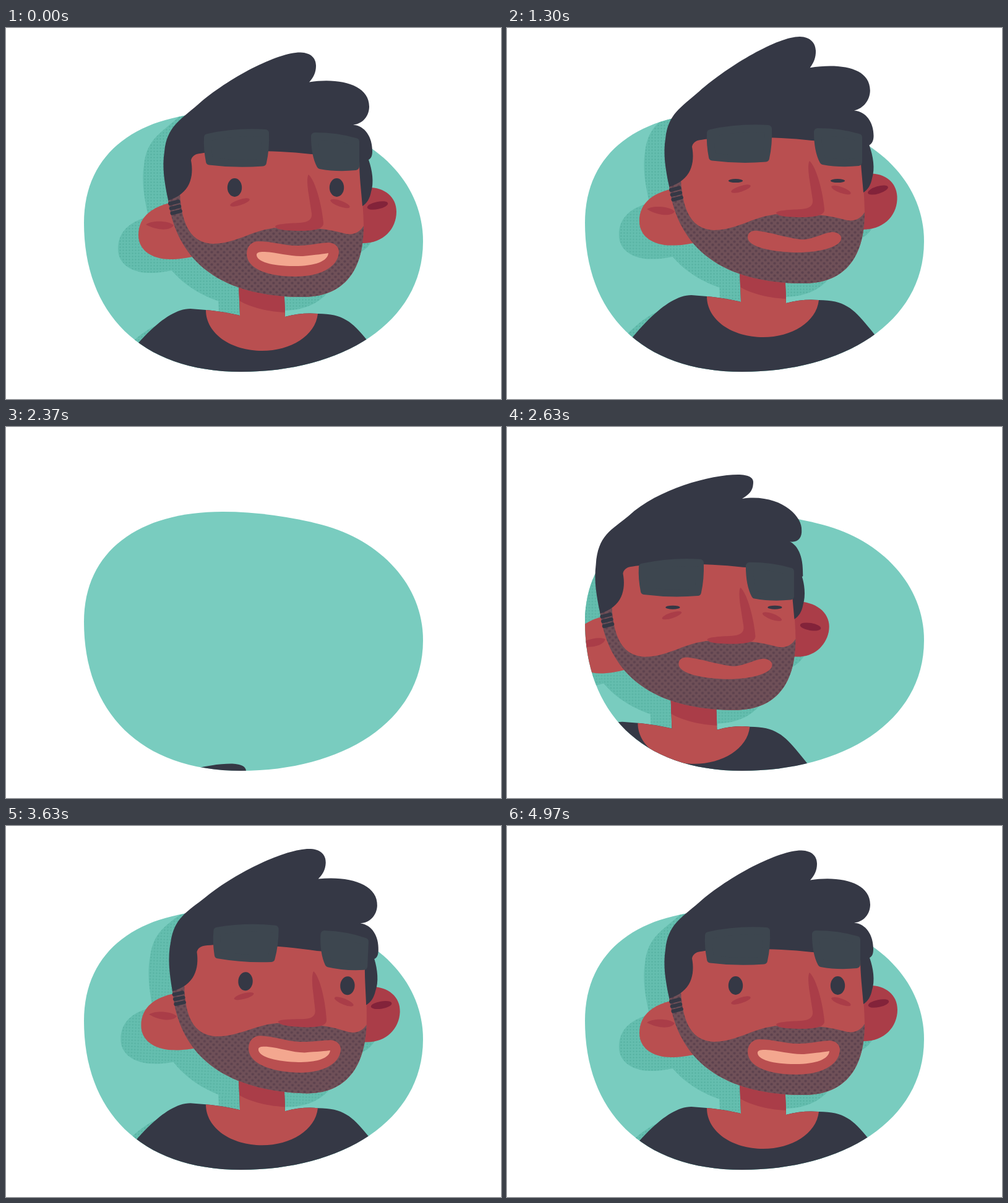
An HTML page with a canvas for the animation above (5.01 s loop, 800 by 600 pixels).

```html
<!DOCTYPE html>
<html lang="en">
<head>
<meta charset="utf-8">
<title>Hopping portrait</title>
<style>
html, body { margin: 0; width: 100%; height: 100%; overflow: hidden; background: #fff; }
canvas { display: block; }
</style>
</head>
<body>
<canvas id="stage" width="800" height="600"></canvas>
<script>
const ctx = document.getElementById('stage').getContext('2d');
const LOOP = 5010, STEP = 66.67;
const SKIN = '#b94f50', RED = '#aa3d48', WINE = '#83233a', DARK = '#353845', LENS = '#3d464f';
const TEAL = '#79ccbf', PEACH = '#f3a78f';

// Outlines
const DOME = 'M126 315C126 200 215 137 350 137C405 137 460 145 510 158C605 183 674 255 674 345';
const BOWL = 'C674 478 541 556 380 556C216 556 126 460 126 315Z';
const COLLAR = 'C345 458 362 461 378 465L376 410L449 410L451 467C470 462 487 460.5 504 462';
const TORSO = 'M170 700L180 552C205 518 255 454 298 454L323 456' + COLLAR + 'C545 462 560 476 582 503C598 522 612 540 620 560L630 700Z';
const CHEST = 'M323 456' + COLLAR + 'C500 498 460 522 414 522C365 522 323 495 323 456Z';
const NECK_SHADE = 'M376 410L377 441C395 452 425 459 451 460L449 410Z';
const JAW = 'C578 400 540 435 480 435C385 435 280 405 262 278';
const FACE = 'M262 278L290 190L571 195C571 240 578 285 578 320' + JAW + 'Z';
const BEARD = 'M578 320' + JAW + 'L262 268L281 268C284 320 300 348 335 349C375 348 400 325 440 323L490 324C515 324 530 328 550 333C562 335 572 330 578 320Z';
const NOSE = 'M489 237C486 240 487 255 489 268L494 300C495 310 488 314 475 315C455 316 436 317 435 321C437 327 455 328 475 328C495 328 514 326 513 315C511 290 501 248 489 237Z';
const EAR_L = 'M310 278C265 278 214 290 214 335C214 361 238 374 265 374C280 374 292 372 310 368Z';
const EAR_L_MARK = 'M226 318C235 311 262 311 271 319C266 328 245 328 226 318Z';
const EAR_R = 'M560 258L580 258C610 256 631 272 631 297C631 325 610 348 577 348L560 348Z';
const HAIR = 'M262 278C256 250 252 225 256 200C260 160 280 150 310 124C360 80 440 39 476 39.5C493 40 501 49 501 61C501 72 497 80 490 87.5C540 80 587 92 587 127C587 142 577 155 561 156.5C580 158 592 176 592 199C592 207 590 211 586 213';
const HAIR_UP = 'M262 278C256 250 252 225 257 200C262 170 280 157 312 128C365 84 435 20 461 20C478 20 488 34 490 50C491 60 490 71 488 80C525 74 584 55 586 104C585 122 573 138 561 151C582 152 595 168 595 184C595 192 589 200 583 205';
const HAIRLINE = 'C592 230 595 250 590 265C588 276 583 284 576 288C574 262 571 240 571 215C550 207 520 205 493 204C460 200 425 199 400 199C360 199 325 200 308 204C303 206 300 209 299 214C304 240 298 268 262 279Z';
const LENSES = 'M326 177Q372 167 419 170Q420 195 415 217.5Q372 221 329 215.5Q325 195 326 177ZM499 175Q535 175 565 184L565 224Q535 227 508 222Q499 205 499 175Z';
const LIPS_SHUT = 'M389 361C389 352 396 349 405 350C430 353 460 364 480 364C495 363 510 354 525 352C536 352 541 358 540 363C539 376 505 385 470 385C430 385 389 376 389 361Z';
const LIPS_OPEN = 'M389 365C389 352 398 345 408 345C430 345 450 352 470 352C490 352 510 347 522 347C533 348 538 355 538 362C537 388 505 402 468 402C425 402 389 390 389 365Z';
const TEETH = 'M405 366C406 362 412 362 418 362C440 363 460 370 480 369C500 367 515 365 521 364C520 377 500 385 466 385C430 385 404 378 405 366Z';

function ramp(t, from, to) {
  const u = Math.min(1, Math.max(0, (t - from) / (to - from)));
  return u * u * (3 - 2 * u);
}
// Rises from a to b, holds, and falls back from c to d
const pulse = (t, a, b, c, d) => ramp(t, a, b) * (1 - ramp(t, c, d));

function height(t) {
  if (t < 1300) return 11 * ramp(t, 500, 930) - 33 * ramp(t, 1030, 1300);
  if (t < 2200) return -22 + 174 * ((t - 1300) / 265) ** 3;
  const rise = 830 * Math.max(0, 1 - (t - 2300) / 400) ** 3;
  const bounce = 20 * (1 - ramp(t, 2900, 4050)) * Math.cos(2 * Math.PI * (t - 3300) / 720);
  return rise + bounce;
}

function poseAt(t) {
  const look = 10 * pulse(t, 2200, 2300, 4450, 4720);
  const falling = pulse(t, 1300, 1560, 1750, 2200);
  return {
    x: t < 2200 ? 0 : -122 * (1 - ramp(t, 2450, 3450)),
    y: height(t),
    tilt: -7.4 * pulse(t, 2650, 3200, 3250, 3500) + 2.5 * pulse(t, 3250, 3550, 3550, 4300),
    // Hair and ears trail behind: positive is upwards
    sway: pulse(t, 1200, 1560, 1750, 2200) - .4 * pulse(t, 930, 1130, 1130, 1290)
      - .8 * pulse(t, 2200, 2300, 2600, 2850) + .6 * pulse(t, 2750, 2950, 3230, 3420)
      - .3 * pulse(t, 3250, 3400, 3400, 3600),
    look,
    lensX: .45 * look + 3 * pulse(t, 930, 1250, 1750, 2200),
    lensY: 15 * pulse(t, 930, 1250, 1300, 1560) - 3 * falling + 27 * pulse(t, 2200, 2300, 2630, 3800),
    shut: pulse(t, 930, 1090, 2800, 3000),
    smile: 1 - pulse(t, 900, 1150, 2830, 3100),
    mouthY: -18 * falling
  };
}

function blend(a, b, k) {
  const ends = b.match(/[\d.]+/g);
  let i = 0;
  return a.replace(/[\d.]+/g, n => (+n + (ends[i++] - n) * k).toFixed(2));
}

function dots(size, base, ink, r, spots) {
  const tile = document.createElement('canvas'), c = tile.getContext('2d');
  tile.width = tile.height = size;
  c.fillStyle = base;
  c.fillRect(0, 0, size, size);
  c.fillStyle = ink;
  for (const s of spots) {
    c.beginPath();
    c.arc(s, s, r, 0, 7);
    c.fill();
  }
  return ctx.createPattern(tile, 'repeat');
}
const STUBBLE = dots(10, '#6f5058', '#5d424e', 2.1, [2.5, 7.5]);
const SHADOW = dots(5, '#65beaf', '#58b3a3', 1.3, [2.5]);

let shade = null;
function fill(d, color) {
  ctx.fillStyle = shade || color;
  ctx.fill(new Path2D(d));
}
function outline(d, color, width) {
  ctx.strokeStyle = color;
  ctx.lineWidth = width;
  ctx.lineCap = ctx.lineJoin = 'round';
  ctx.stroke(new Path2D(d));
}
function oval(x, y, rx, ry, deg, color) {
  ctx.fillStyle = color;
  ctx.beginPath();
  ctx.ellipse(x, y, rx, ry, deg * Math.PI / 180, 0, 7);
  ctx.fill();
}
function group(x, y, draw) {
  ctx.save();
  ctx.translate(x, y);
  draw();
  ctx.restore();
}
function turn(deg, x, y) {
  ctx.translate(x, y);
  ctx.rotate(deg * Math.PI / 180);
  ctx.translate(-x, -y);
}

function ears(sway) {
  group(0, 0, () => {
    turn(4 * sway, 300, 330);
    fill(EAR_L, SKIN);
    turn(16 * sway, 271, 319);
    if (!shade) fill(EAR_L_MARK, RED);
  });
  group(0, 0, () => {
    turn(-16 * sway, 575, 305);
    fill(EAR_R, RED);
    if (!shade) oval(600.5, 287 - 10 * sway, 17, 6, -12 - 12 * sway, WINE);
  });
}

function mouth(smile) {
  fill(blend(LIPS_SHUT, LIPS_OPEN, smile), SKIN);
  if (smile < .1) return;
  ctx.translate(0, 367 * (1 - smile));
  ctx.scale(1, smile);
  fill(TEETH, PEACH);
}

function features(p) {
  fill(BEARD, STUBBLE);
  fill(NOSE, RED);
  oval(378, 282, 16.5, 4.6, -18, RED);
  oval(540, 284, 16.5, 4.8, 20, RED);
  for (const x of [369.5, 534.5])
    oval(x + p.look, 258 + 11 * p.shut, 11.7, 15 - 12 * p.shut, 0, DARK);
  group(0, p.mouthY, () => mouth(p.smile));
}

function man(p) {
  // The ears lie behind the torso, the rest of the head in front
  const head = draw => group(0, 0, () => { turn(p.tilt, 405, 436); draw(); });
  head(() => ears(p.sway));
  fill(TORSO, DARK);
  if (!shade) {
    fill(CHEST, SKIN);
    fill(NECK_SHADE, RED);
  }
  head(() => {
    fill(FACE, SKIN);
    if (!shade) features(p);
    fill(blend(HAIR, HAIR_UP, p.sway) + HAIRLINE, DARK);
    if (shade) return;
    for (let i = 0; i < 3; i++)
      group(1.7 * i, 7.8 * i, () => outline('M265 284L278.5 280.5', DARK, 6));
    group(p.lensX, p.lensY, () => {
      fill(LENSES, LENS);
      outline(LENSES, LENS, 12);
    });
  });
}

function clipped(d, draw) {
  ctx.save();
  ctx.clip(new Path2D(d));
  draw();
  ctx.restore();
}

function render(t) {
  const p = poseAt(t);
  ctx.fillStyle = '#fff';
  ctx.fillRect(0, 0, 800, 600);
  fill(DOME + BOWL, TEAL);
  shade = SHADOW;
  clipped(DOME + BOWL, () => group(p.x - 33, p.y + 22, () => man(p)));
  shade = null;
  // Open above the blob, so the hair can stick out
  clipped('M126 315L126 0L674 0L674 345' + BOWL, () => group(p.x, p.y, () => man(p)));
}

const start = performance.now();
function tick() {
  const t = (performance.now() - start) % LOOP;
  // The picture is held for about 67 ms at a time
  render(Math.max(0, Math.floor((t + 37) / STEP) * STEP - 37));
  requestAnimationFrame(tick);
}
tick();
</script>
</body>
</html>
```
